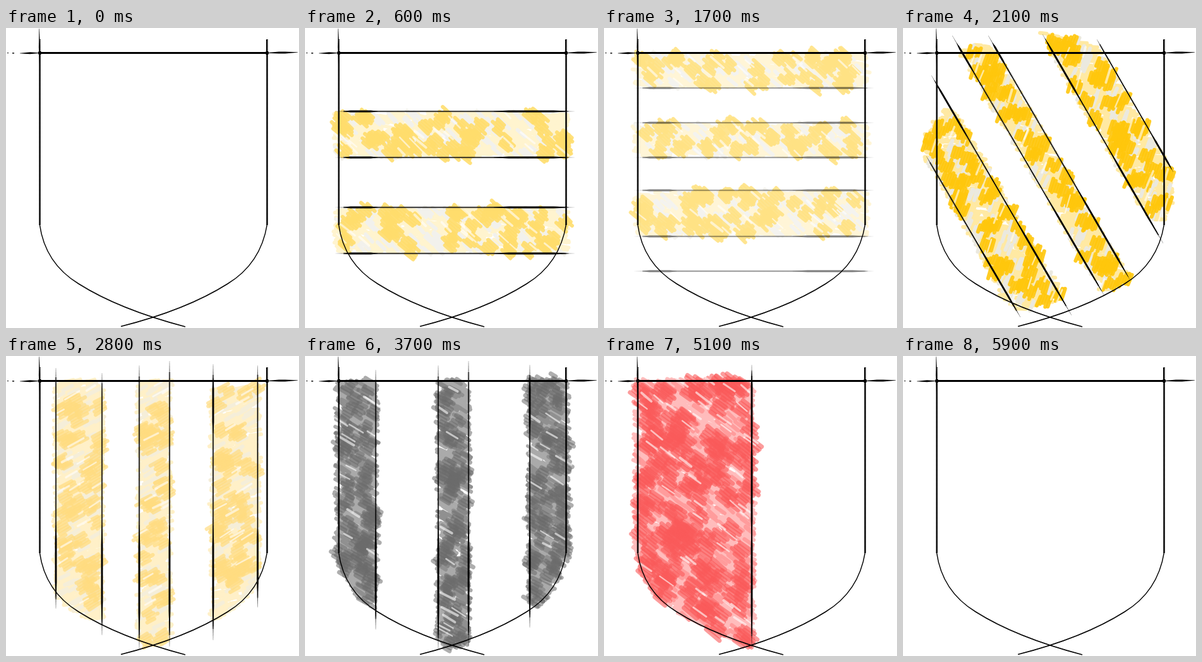
An HTML page with a canvas for the animation above (6000 ms loop, 464x475 px).

```html
<!DOCTYPE html>
<html lang="en">
<head>
<meta charset="utf-8">
<title>Shield divisions</title>
<style>
html, body { margin: 0; width: 100%; height: 100%; overflow: hidden; background: #fff; }
canvas { display: block; }
</style>
</head>
<body>
<canvas id="stage" width="464" height="475"></canvas>
<script>
const W = 464, H = 475, LOOP = 6000;
const ctx = document.getElementById('stage').getContext('2d');

function random(seed) {
  return () => {
    seed = (seed + 0x6D2B79F5) | 0;
    let n = Math.imul(seed ^ seed >>> 15, 1 | seed);
    n = n + Math.imul(n ^ n >>> 7, 61 | n) ^ n;
    return ((n ^ n >>> 14) >>> 0) / 4294967296;
  };
}

function layer(draw) {
  const c = document.createElement('canvas');
  c.width = W;
  c.height = H;
  draw(c.getContext('2d'));
  return c;
}

// Pen strokes
function taper(g, x0, y0, x1, y1, w, f = 0.08) {
  const len = Math.hypot(x1 - x0, y1 - y0);
  const nx = -(y1 - y0) / len * w / 2, ny = (x1 - x0) / len * w / 2;
  const at = (k, s) => g.lineTo(x0 + (x1 - x0) * k + nx * s, y0 + (y1 - y0) * k + ny * s);
  g.beginPath();
  at(0, 0.2); at(f, 1); at(1 - f, 1); at(1, 0.2);
  at(1, -0.2); at(1 - f, -1); at(f, -1); at(0, -0.2);
  g.fill();
}

function dotted(g, x0, y0, x1, y1, w, color) {
  g.strokeStyle = color;
  g.lineWidth = w;
  g.setLineDash([1, 1]);
  g.beginPath();
  g.moveTo(x0, y0);
  g.lineTo(x1, y1);
  g.stroke();
  g.setLineDash([]);
}

function pen(g, x0, y0, x1, y1, heavy = []) {
  g.fillStyle = '#000';
  const at = k => [x0 + (x1 - x0) * k, y0 + (y1 - y0) * k];
  dotted(g, ...at(0.04), ...at(0.96), 2.4, '#222');
  taper(g, x0, y0, x1, y1, 1.2);
  for (const [a, b] of heavy) taper(g, ...at(a), ...at(b), 2.8, 0.2);
}

const upright = (g, x, top, bottom, extra = []) =>
  pen(g, x, top, x, bottom, [[(268 - top) / (bottom - top), 0.95], ...extra]);
const level = (g, y) => pen(g, 46, y, 429, y, [[0.04, 0.18], [0.66, 0.97]]);
const levels = ys => layer(g => ys.forEach(y => level(g, y)));

// Crayon fills
const CRAYON = {
  barry: { pale: '#ffedb0', wash: '#ebe9e0', deep: '#ffc60c', angle: 0.66, edge: 0.05, len: 30, w: 6, clumps: 520, alpha: 0.9 },
  bendy: { pale: '#ffe9a3', wash: '#ebe9df', deep: '#ffc60c', angle: -1.3, edge: 0, len: 29, w: 6, clumps: 480, alpha: 0.9 },
  paly: { pale: '#ffe7a4', wash: '#f0e4c0', deep: '#ffc52c', angle: -0.6, edge: -0.3, len: 32, w: 6, clumps: 560, alpha: 0.7 },
  sable: { pale: '#aaa', wash: '#909090', deep: '#6c6c6c', angle: 0.45, edge: 0.4, len: 24, w: 7, clumps: 330, alpha: 0.55 },
  gules: { pale: '#ffbcbc', wash: '#ff9c9c', deep: '#fa5a5a', angle: 0.58, edge: 0.4, len: 40, w: 7, clumps: 520, alpha: 0.6 }
};

const outline = new Path2D('M53 39V311C58 345 74 380 115 405C150 427 190 444 233 459' +
  'C276 444 316 427 351 405C392 380 408 345 413 311V39Z');

function crayon(style, seed, polygons, inShield = false) {
  return layer(g => {
    const rnd = random(seed);
    g.lineCap = 'round';

    const dash = (x, y, angle, len, w, color) => {
      const dx = Math.cos(angle) * len / 2, dy = Math.sin(angle) * len / 2;
      g.strokeStyle = color;
      g.lineWidth = w;
      g.beginPath();
      g.moveTo(x - dx, y - dy);
      g.lineTo(x + dx, y + dy);
      g.stroke();
    };

    for (const pts of polygons) {
      const path = new Path2D('M' + pts.map(p => p.join(' ')).join('L') + 'Z');
      const xs = pts.map(p => p[0]), ys = pts.map(p => p[1]);
      const left = Math.min(...xs), top = Math.min(...ys);
      const w = Math.max(...xs) - left, h = Math.max(...ys) - top;

      const scatter = (spread, mark) => {
        for (let i = w * h / spread; i > 0; i--) {
          const x = left + rnd() * w, y = top + rnd() * h;
          if (!g.isPointInPath(path, x, y)) continue;
          if (inShield && !g.isPointInPath(outline, x, y)) continue;
          mark(x, y);
        }
      };

      scatter(26, (x, y) => dash(x, y, style.edge + rnd() * 0.2, 8 + rnd() * 10, 6, style.pale));
      scatter(260, (x, y) => dash(x, y, style.angle + rnd() * 0.2, 16, 6, style.wash));
      g.globalAlpha = style.alpha;
      scatter(style.clumps, (x, y) => {
        for (let i = -2; i <= 2; i++) {
          const off = i * style.w * 0.7, slide = rnd() * 10 - 5;
          dash(x - Math.sin(style.angle) * off + Math.cos(style.angle) * slide,
            y + Math.cos(style.angle) * off + Math.sin(style.angle) * slide,
            style.angle + rnd() * 0.14, style.len * (0.35 + rnd() * 0.35), style.w, style.deep);
        }
      });
      g.globalAlpha = 0.6;
      scatter(1500, (x, y) => dash(x, y, style.angle + rnd() * 0.15, 14 + rnd() * 16, 2 + rnd() * 2, '#fff'));
      g.globalAlpha = 1;
    }
  });
}

const rect = (x0, y0, x1, y1) => [[x0, y0], [x1, y0], [x1, y1], [x0, y1]];
const bar = (y0, y1) => rect(53, y0 + 3, 413, y1 - 3);
const pale = (x0, x1) => rect(x0 + 2, 39, x1 - 2, 460);

const frame = layer(g => {
  taper(g, 22, 40, 54, 39.5, 3, 0.5);
  taper(g, 412, 39.5, 462, 38.5, 3, 0.4);
  g.fillRect(53, 38, 360, 3);
  g.fillRect(2, 39, 2, 1);
  g.fillRect(10, 39, 3, 1.5);
  for (const x of [53.5, 413.5]) {
    dotted(g, x, 18, x, 312, 3, '#000');
    g.fillRect(x - 1, 39, 2, 273);
    g.beginPath();
    g.ellipse(x, 39.5, 2.6, 3, 0, 0, 7);
    g.fill();
  }
  taper(g, 52.6, 1, 53.3, 60, 2.2, 0.5);
  g.fillRect(412, 18, 2, 22);
  g.lineWidth = 1.5;
  g.stroke(new Path2D('M53.3 311C58 345 74 380 115 405C153 429 208 453 284 473'));
  g.stroke(new Path2D('M413.5 311C408 345 392 380 351 405C313 429 259 453 182 472.5'));
});

const fessLines = levels([175, 315]);
const fess = crayon(CRAYON.barry, 3, [bar(175, 315)]);
const closeLines = levels([132, 205, 284, 357]);
const closeBars = crayon(CRAYON.barry, 5, [bar(132, 205), bar(284, 357)]);
const barLines = levels([78.5, 150, 205, 257, 330]);
const bars = crayon(CRAYON.barry, 8, [bar(78, 150), bar(257, 330)]);
const barryLines = levels([95, 150, 205, 257, 330, 385]);
const barry = crayon(CRAYON.barry, 11, [bar(39, 95), bar(150, 205), bar(257, 330)], true);

const bendLines = layer(g => {
  pen(g, 37, 203, 186, 458, [[0.55, 0.96]]);
  pen(g, 45, 75, 267, 455, [[0.02, 0.26], [0.6, 0.96]]);
  pen(g, 78, 12, 319, 424, [[0.03, 0.14], [0.62, 0.98]]);
  pen(g, 135, 12, 359, 398, [[0.03, 0.12], [0.62, 0.99]]);
  pen(g, 221, 10, 412, 341, [[0.02, 0.32], [0.55, 0.96]]);
  pen(g, 307, 18, 428, 228, [[0.72, 0.98]]);
});
const bendA = [[40, 172], [68, 128], [86, 143], [252, 428], [182, 446], [154, 420], [150, 400], [41, 208]];
const bendB = [[114, 26], [134, 26], [145, 42], [355, 398], [317, 415], [96, 40]];
const bendC = [[222, 6], [236, 9], [306, 30], [424, 232], [420, 285], [404, 310], [382, 284], [222, 12]];
const bends = crayon(CRAYON.bendy, 21, [bendA, bendB, bendC]);
const oneBend = crayon(CRAYON.bendy, 23, [bendB]);

const centreLines = layer(g => {
  upright(g, 211, 15, 464);
  upright(g, 259, 8, 460);
});
const palyLines = layer(g => {
  upright(g, 79, 19, 400);
  upright(g, 152, 27, 442);
  upright(g, 328, 13, 450, [[0.05, 0.25]]);
  upright(g, 398.5, 15, 398);
});
const paly = crayon(CRAYON.paly, 31,
  [rect(82, 32, 149, 460), pale(212, 258), rect(330, 50, 396, 460)], true);

const sideLines = layer(g => {
  upright(g, 112, 22, 433);
  upright(g, 356, 14, 430, [[0.05, 0.26]]);
});
const sides = crayon(CRAYON.sable, 41, [pale(51, 112), pale(356, 415)], true);
const centre = crayon(CRAYON.sable, 43, [pale(212, 258)], true);

const halfLine = layer(g => upright(g, 234, 14, 462, [[0.02, 0.3], [0.25, 0.62]]));
const half = crayon(CRAYON.gules, 53, [pale(51, 235)], true);

// Each step: start time, then layers with their opacity
const steps = [
  [0],
  [100, [fessLines, 0.5]],
  [200, [fessLines, 1], [fess, 0.4]],
  [300, [fess, 0.7], [fessLines, 1]],
  [400, [fess, 1], [fessLines, 1]],
  [500, [fess, 0.4], [closeLines, 0.6]],
  [600, [closeBars, 0.6], [closeLines, 1]],
  [700, [closeBars, 1], [closeLines, 1]],
  [800, [closeBars, 0.4], [barLines, 0.6]],
  [900, [bars, 0.6], [barLines, 1]],
  [1000, [bars, 1], [barLines, 1]],
  [1100, [bars, 0.4], [barry, 0.5], [barryLines, 1]],
  [1200, [barry, 1], [barryLines, 1]],
  [1700, [barry, 0.5], [barryLines, 0.5]],
  [1800, [bendLines, 0.5]],
  [1900, [oneBend, 0.6], [bendLines, 1]],
  [2000, [bends, 0.7], [bendLines, 1]],
  [2100, [bends, 1], [bendLines, 1]],
  [2200, [bends, 0.4], [bendLines, 0.5], [palyLines, 0.5], [centreLines, 0.5]],
  [2300, [palyLines, 1], [centreLines, 1]],
  [2800, [paly, 0.6], [palyLines, 1], [centreLines, 1]],
  [3000, [paly, 0.8], [palyLines, 1], [centreLines, 1]],
  [3200, [paly, 1], [palyLines, 1], [centreLines, 1]],
  [3700, [sides, 1], [centre, 1], [sideLines, 1], [centreLines, 1]],
  [3900, [sides, 0.5], [centre, 1], [centreLines, 1]],
  [4100, [centre, 1], [centreLines, 1]],
  [4300, [centre, 0.5], [centreLines, 0.5], [halfLine, 0.5]],
  [4500, [halfLine, 1]],
  [4700, [half, 0.35], [halfLine, 1]],
  [4900, [half, 0.7], [halfLine, 1]],
  [5100, [half, 1], [halfLine, 1]],
  [5600, [half, 0.75], [halfLine, 0.75]],
  [5700, [half, 0.5], [halfLine, 0.5]],
  [5800, [half, 0.25], [halfLine, 0.25]],
  [5900]
];

function render(t) {
  const [, ...parts] = steps.filter(s => s[0] <= t).pop();
  ctx.globalAlpha = 1;
  ctx.fillStyle = '#fff';
  ctx.fillRect(0, 0, W, H);
  for (const [image, alpha] of parts) {
    ctx.globalAlpha = alpha;
    ctx.drawImage(image, 0, 0);
  }
  ctx.globalAlpha = 1;
  ctx.drawImage(frame, 0, 0);
}

const start = performance.now();
function tick() {
  render((performance.now() - start) % LOOP);
  requestAnimationFrame(tick);
}
tick();
</script>
</body>
</html>
```
